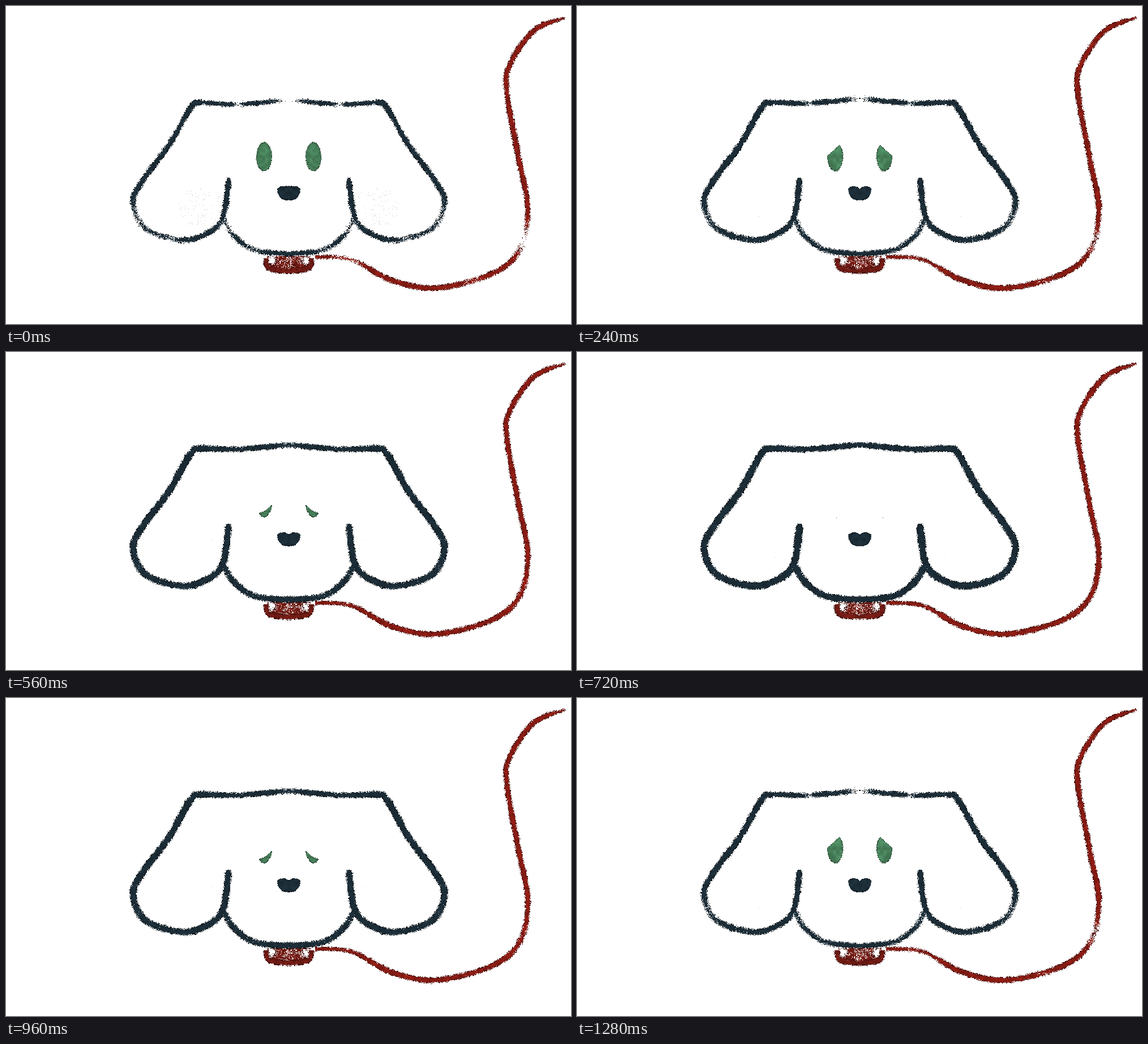
Recreate the animation shown at these times as an HTML page with a canvas. Size 998 by 561 pixels, loop 1.44 s.

```html
<!DOCTYPE html>
<html lang="en">
<head>
<meta charset="utf-8">
<title>Blinking dog on a leash</title>
<style>
html, body { margin: 0; width: 100%; height: 100%; overflow: hidden; background: #fff; }
canvas { display: block; width: 998px; height: 561px; }
</style>
</head>
<body>
<canvas id="stage" width="998" height="561"></canvas>
<script>
const W = 998, H = 561, MID = 499, LAST = 5;
const NAVY = [28, 45, 55], RED = [137, 28, 20], MAROON = [112, 27, 20], GREEN = [73, 131, 92], GREY = [190, 194, 197];
const ctx = document.getElementById('stage').getContext('2d');

// Key points; the head is its left half, mirrored about MID
const leash = [[987, 20], [932, 43], [890, 102], [884, 150], [905, 268], [921, 355], [908, 427],
  [860, 471], [760, 497], [680, 483], [610, 447], [546, 442]];
const ear = [[393, 303], [382, 374], [350, 403], [305, 412], [245, 391], [224, 345], [242, 306],
  [288, 244], [325, 180], [343, 170]];
const chin = [[385, 378], [402, 405], [438, 430], [MID, 437]];
const collar = [[459, 445], [461, 459], [474, 465], [MID, 467]];

// Where the chalk runs dry: x, y, radius, strength
const drySpots = [[499, 165, 20, 1], [410, 172, 10, .6], [235, 375, 32, .45], [290, 408, 30, .3],
  [393, 390, 18, .5], [435, 430, 22, .35], [912, 412, 28, .75], [600, 445, 28, .4], [825, 487, 20, .35]];
const collarSpots = [[468, 448, 9, .9], [531, 449, 9, .9], [500, 450, 22, .4]];

// step: 0 is wide awake, LAST is asleep; the line gets fuller on the way
let step, fade, weight, pixels;

function hash(x, y) {
  let h = Math.imul(x + 57, 374761393) ^ Math.imul(y + 91, 668265263) ^ Math.imul(step + 1, 974634777);
  h = Math.imul(h ^ (h >>> 13), 1274126177);
  h = Math.imul(h ^ (h >>> 15), 2246822519);
  return ((h ^ (h >>> 16)) >>> 0) / 2 ** 32;
}

function noise(x, y) {
  const i = Math.floor(x), j = Math.floor(y), u = x - i, v = y - j;
  const top = hash(i, j) * (1 - u) + hash(i + 1, j) * u;
  const low = hash(i, j + 1) * (1 - u) + hash(i + 1, j + 1) * u;
  return top * (1 - v) + low * v;
}

function plot(x, y, color, shade, mirror) {
  if (x < 0 || y < 0 || x >= W || y >= H) return;
  const k = (y * W + x) * 4;
  for (let c = 0; c < 3; c++) pixels[k + c] = color[c] * shade;
  if (mirror) plot(2 * MID - x, y, color, shade);
}

// One grain of chalk; depth is the distance inside the edge
function ink(x, y, depth, soft, density, color, mirror) {
  const cover = Math.max(0, Math.min(1, depth / soft + .5)) * density;
  if (.6 * hash(x, y) + .4 * noise(x / 2, y / 2) >= cover) return;
  const shade = depth < 1 || density < .6 ? .6 : .82 + .34 * noise(x / 5, y / 5);
  plot(x, y, color, shade, mirror);
}

function dryness(x, y, spots, scale) {
  const sum = spots.reduce((s, [sx, sy, r, k]) => s + k * Math.exp(-((x - sx) ** 2 + (y - sy) ** 2) / r ** 2), 0);
  return Math.min(1, sum * scale);
}

function spline(a, b, c, d, t) {
  return b + .5 * t * (c - a + t * (2 * a - 5 * b + 4 * c - d + t * (3 * (b - c) + d - a)));
}

function stroke(points, width, color, mirror) {
  let run = 0;
  for (let i = 0; i < points.length - 1; i++) {
    const p = points[i], q = points[i + 1], o = points[i - 1] || p, r = points[i + 2] || q;
    const count = Math.ceil(Math.hypot(q[0] - p[0], q[1] - p[1]) * 2.2);
    const at = t => [0, 1].map(k => spline(o[k], p[k], q[k], r[k], t));
    for (let n = 0; n < count; n++) {
      const [x, y] = at(n / count), [x2, y2] = at((n + 1) / count);
      const len = Math.hypot(x2 - x, y2 - y) || 1;
      const nx = (y - y2) / len, ny = (x2 - x) / len;
      const dry = dryness(x, y, drySpots, fade);
      const half = width(x, y, run) / 2 + (noise(run / 5, 3) - .5) * 1.4;
      for (let d = -half - 5; d <= half + 5; d += .5)
        ink(Math.round(x + nx * d), Math.round(y + ny * d), half - Math.abs(d), 4.5 + 4 * dry, 1 - dry, color, mirror);
      run += len;
    }
  }
}

function area(x0, y0, x1, y1, depth, color, mirror, spots = []) {
  for (let y = y0; y <= y1; y++)
    for (let x = x0; x <= x1; x++)
      ink(x, y, depth(x, y), 2, 1 - dryness(x, y, spots, 1), color, mirror);
}

function drawDust() {
  for (let i = 0; i < 90 * fade ** 12; i++) {
    const a = hash(i, 700) * 2 * Math.PI, r = Math.sqrt(hash(i, 800));
    plot(Math.round(345 + 42 * r * Math.cos(a)), Math.round(355 + 36 * r * Math.sin(a)), GREY, 1, true);
  }
}

function drawCollar() {
  area(461, 441, 537, 465, (x, y) => Math.min(y - 440, 466 - y), MAROON, false, collarSpots);
  stroke(collar, () => 9, MAROON, true);
}

function drawHead() {
  const dip = step < 2 ? 2 : 0;
  const crown = [[407, 171 + dip], [MID, 163 + dip]];
  stroke([...ear, ...crown], (x, y, run) =>
    y < 178 && x > 345 ? weight * .82 : weight * Math.min(1, .5 + run / 14), NAVY, true);
  stroke(chin, () => weight * .92, NAVY, true);
}

function drawEyes() {
  const outer = 244 + 10 * step, rise = 32 - 4.5 * step, bend = 1 + .6 * (step - 2);
  area(440, 238, 471, 293, (x, y) => {
    const eye = (1 - Math.hypot((x - 455.5) / 13.5, (y - 265.5) / 24.8)) * 13.5;
    const lid = outer - rise * Math.max(0, (x - 442) / 26) ** bend;
    return .4 + (step < 2 ? eye : Math.min(eye, y - lid));
  }, GREEN, true);
}

function drawNose() {
  const notch = Math.min(4, 2 * step);
  area(476, 314, MID, 345, (x, y) => {
    const d = MID - x, u = d / 20;
    const top = 317.5 + notch * Math.exp(-d * d / 14) + 4 * u ** 6;
    return Math.min(y - top, 342 - 13 * u ** 3.5 - y, 20 - d);
  }, NAVY, true);
}

function drawPicture(n) {
  const image = new ImageData(W, H);
  pixels = image.data.fill(255);
  step = n;
  fade = 1 - .9 * n / LAST;
  weight = 8.8 + .6 * n;
  drawDust();
  stroke(leash, (x, y, run) => Math.min(x < 640 ? 6.5 : 9, 3 + run * .15), RED);
  drawCollar();
  drawHead();
  drawEyes();
  drawNose();
  return image;
}

const pictures = Array.from({ length: LAST + 1 }, (_, n) => drawPicture(n));
let shown = -1;

// Down to sleep and back; both ends are held for 80 ms, the rest for 160
function tick() {
  const time = performance.now() % 1440;
  const beat = Math.min(time, 1439.999 - time + 80);
  const now = Math.max(0, Math.min(LAST, time < 760 ? Math.ceil((time - 79.999) / 160) : Math.ceil(beat / 160)));
  if (now !== shown) ctx.putImageData(pictures[shown = now], 0, 0);
  requestAnimationFrame(tick);
}
tick();
</script>
</body>
</html>
```
